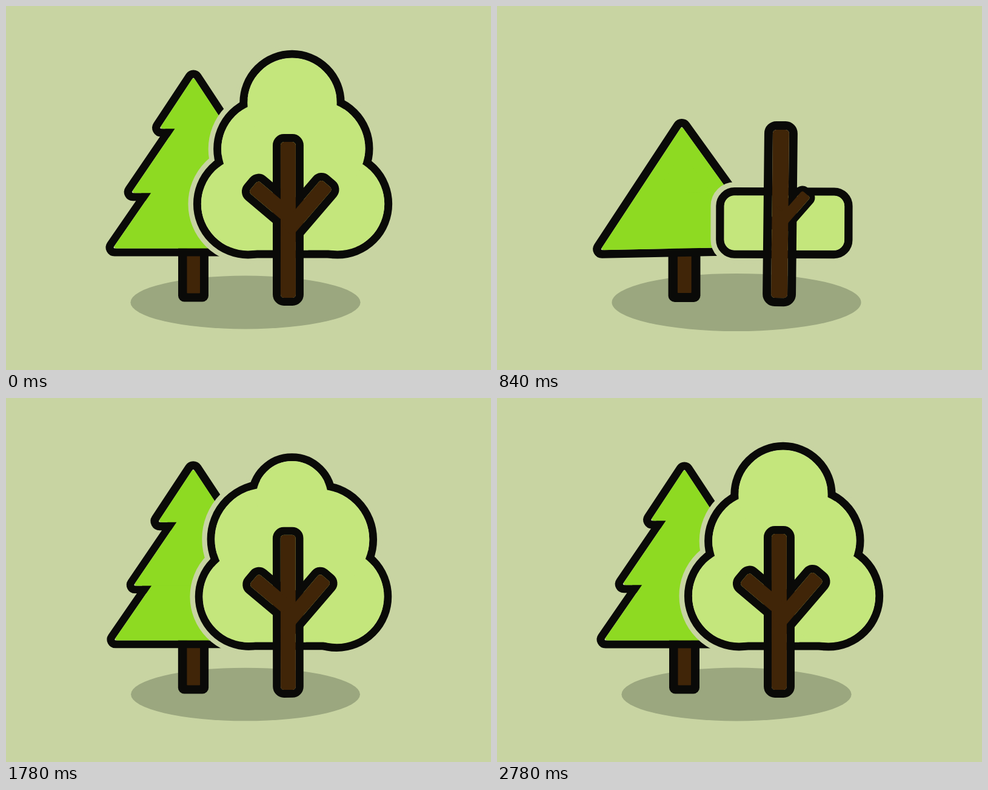
An HTML page with a canvas for the animation above (4780 ms loop, 800 by 600 pixels).

```html
<!DOCTYPE html>
<html lang="en">
<head>
<meta charset="utf-8">
<title>Growing trees</title>
<style>
  html, body { margin: 0; width: 100%; height: 100%; overflow: hidden; background: #c8d4a2; }
  canvas { display: block; width: 800px; height: 600px; }
</style>
</head>
<body>
<canvas id="stage" width="800" height="600"></canvas>
<script>
const ctx = document.getElementById('stage').getContext('2d');
const LOOP = 4780, START = 100, END = 2780, STEP = 20;
const BG = '#c8d4a2', SHADE = '#9ba77f', INK = '#0a0a08';
const PINE = '#8eda22', LEAF = '#c4e67c', WOOD = '#402508';
const LINE = 13, HALO = 30;

// Linear growth up to `arrive`, then a damped swing that keeps the speed.
function spring(t, arrive, amp = 0.143) {
  const d = (t - arrive) / 1000;
  if (d < 0) return Math.max(0, 1 + d * amp * 20);
  return 1 + amp * Math.exp(-2 * d) * Math.sin(d * Math.PI * 2 / 1.2);
}

function grow(x, y, scale, degrees, draw) {
  if (scale <= 0) return;
  ctx.save();
  ctx.translate(x, y);
  ctx.rotate(degrees * Math.PI / 180);
  ctx.scale(scale, scale);
  ctx.translate(-x, -y);
  draw();
  ctx.restore();
}

function stroke(color, width = LINE) {
  return () => {
    ctx.strokeStyle = color;
    ctx.lineWidth = width;
    ctx.stroke();
  };
}

function fill(color) {
  return () => {
    ctx.fillStyle = color;
    ctx.fill();
  };
}

function box(x, y, w, h, r) {
  ctx.beginPath();
  ctx.roundRect(x, y, w, h, r);
}

function triangle(cx, base, half, height, r) {
  ctx.beginPath();
  ctx.moveTo(cx, base);
  ctx.arcTo(cx - half, base, cx, base - height, r);
  ctx.arcTo(cx, base - height, cx + half, base, r);
  ctx.arcTo(cx + half, base, cx, base, r);
  ctx.closePath();
}

// Outline every shape first, then fill their insides so they merge.
function merge(shapes, color, halo) {
  if (halo) shapes(stroke(BG, HALO), 0);
  shapes(stroke(INK), 0);
  shapes(fill(color), LINE / 2);
}

function shadow(t) {
  grow(395, 488.5, spring(t, 650), 0, () => {
    ctx.beginPath();
    ctx.ellipse(395, 488.5, 190, 44, 0, 0, Math.PI * 2);
    fill(SHADE)();
  });
}

function pine(t) {
  grow(309, 480, spring(t, 450), 0, () => {
    box(284, 383, 50, 104.5, 10);
    fill(INK)();
    box(298.5, 397, 21.5, 76.5, 1);
    fill(WOOD)();
  });

  const tilt = 6 * Math.max(-0.2, spring(t, 1160) - 1);
  const tiers = [
    [314.5, 115, 169, spring(t, 1040)],
    [208.5, 68, 103, spring(t, 1390)]
  ];
  merge((paint, inset) => {
    const tier = (base, half, height) => {
      // Move all three sides inwards by `inset`.
      const slope = height / half;
      const h = height - inset - inset * Math.hypot(1, slope);
      triangle(309, base - inset, h / slope, h, inset ? 3 : 8);
      paint();
    };
    grow(309, 400, spring(t, 772, 0.137), tilt, () => {
      tier(406, 145.5, 211);
      for (const [base, half, height, size] of tiers)
        grow(309, base, size, 0, () => tier(base, half, height));
    });
  }, PINE);
}

function crown(t) {
  const s = spring(t, 790);
  // Centre, radius, size and, for the middle pair, the point they grow from.
  const puffs = [
    [399, 326, 83.5, spring(t, 1174)],
    [547, 326, 83.5, spring(t, 1298, 0.13)],
    [432, 235, 84.5, spring(t, 1650, 0.2), 467, 290],
    [514.5, 235, 84, spring(t, 1454, 0.16), 479, 290],
    [472, 159, 83.5, spring(t, 1817, 0.27)]
  ];
  merge((paint, inset) => {
    grow(465, 401, s, 3.3 * (s - 1), () => {
      box(371 + inset, 309 + inset, 205 - 2 * inset, 100 - 2 * inset, 23 - inset);
      paint();
      for (const [x, y, r, size, px = x, py = y] of puffs) {
        const radius = r * size - inset;
        if (size <= 0 || radius <= 0) continue;
        ctx.beginPath();
        ctx.arc(px + (x - px) * size, py + (y - py) * size, radius, 0, Math.PI * 2);
        paint();
      }
    });
  }, LEAF, true);
}

function trunk(t) {
  const s = spring(t, 685);
  // Start and tip of each branch.
  const branches = [
    [469, 348, 398, 288.4, spring(t, 1140)],
    [459, 375.5, 538, 283.5, spring(t, 960)]
  ];
  merge((paint, inset) => {
    const bar = (x, y, length) => {
      box(x - 19 + inset, y - length + inset, 38 - 2 * inset, length - 2 * inset, 12 - inset);
      paint();
    };
    grow(465, 480, s, 8 * (s - 1), () => {
      bar(465.5, 487.5, 270.5);
      for (const [x, y, tx, ty, size] of branches) {
        const angle = Math.atan2(tx - x, y - ty) * 180 / Math.PI;
        grow(x, y, size, angle, () => bar(x, y, Math.hypot(tx - x, ty - y) - LINE / 2));
      }
    });
  }, WOOD);
}

function render(ms) {
  const now = Math.floor((ms % LOOP) / STEP) * STEP;
  const t = now < START ? END : Math.min(now, END);
  ctx.fillStyle = BG;
  ctx.fillRect(0, 0, 800, 600);
  shadow(t);
  pine(t);
  crown(t);
  trunk(t);
}

const began = performance.now();
function tick() {
  render(performance.now() - began);
  requestAnimationFrame(tick);
}
tick();
</script>
</body>
</html>
```
